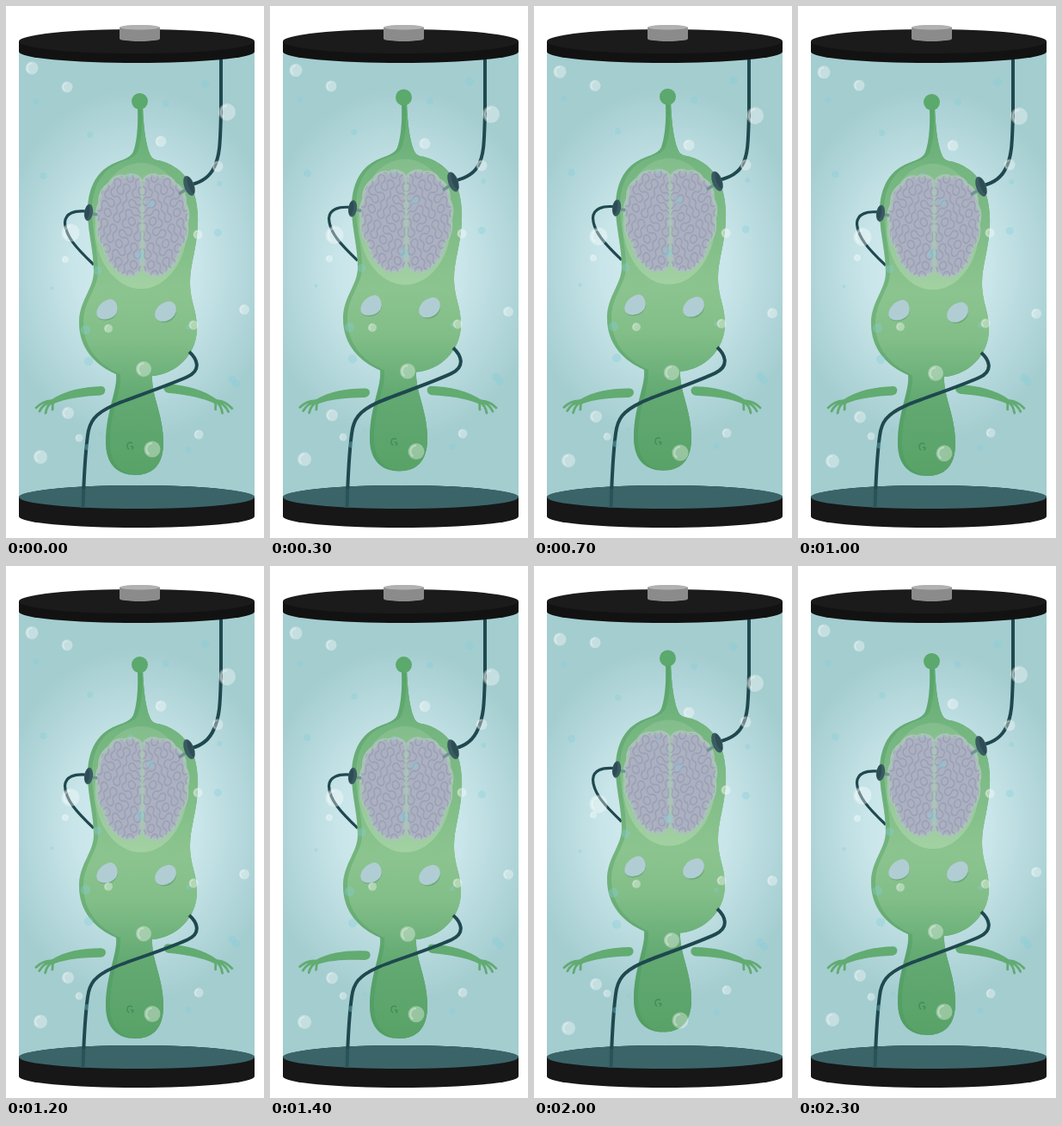
Animation, 300 px wide and 617 px high, one loop 2400 ms. Source, as an HTML page:

```html
<!DOCTYPE html>
<html lang="en">
<head>
<meta charset="utf-8">
<title>Specimen tank</title>
<style>
  html, body { margin: 0; width: 100%; height: 100%; overflow: hidden; background: #fff; }
  svg { display: block; width: 300px; height: 617px; }
  .wire { fill: none; stroke: #1f484f; stroke-width: 4; }
  .thin { stroke-width: 3.2; }
  .plug { fill: #3a5b63; }
  .slot { fill: #2d4c54; }
  .prong { stroke: #6f9490; stroke-width: 3.5; }
  .fingers { fill: none; stroke: #62ab71; stroke-width: 2.8; stroke-linecap: round; }
  .folds { fill: none; stroke: #9699b2; stroke-width: 1.7; opacity: .65; }
</style>
</head>
<body>
<svg viewBox="0 0 300 617">
  <defs>
    <radialGradient id="water" gradientUnits="userSpaceOnUse" cx="0" cy="0" r="1" gradientTransform="translate(152 300) scale(165 205)">
      <stop offset="0" stop-color="#d8eef1"/>
      <stop offset=".45" stop-color="#c8e5e9"/>
      <stop offset="1" stop-color="#a4cdd0"/>
    </radialGradient>
    <linearGradient id="skin" gradientUnits="userSpaceOnUse" x1="0" y1="100" x2="0" y2="544">
      <stop offset="0" stop-color="#5ba96c"/>
      <stop offset=".2" stop-color="#74b580"/>
      <stop offset=".52" stop-color="#8cc48f"/>
      <stop offset=".64" stop-color="#82be88"/>
      <stop offset=".8" stop-color="#62a972"/>
      <stop offset="1" stop-color="#58a267"/>
    </linearGradient>
    <linearGradient id="dome" x1="0" y1="0" x2="0" y2="1">
      <stop offset="0" stop-color="#83bd8b"/>
      <stop offset="1" stop-color="#a2d1a2"/>
    </linearGradient>
    <path id="torso" d="M153 117 C154 140 152 158 148 169 C144 178 132 178 119 186
      C101 197 95 218 95 238 C95 263 102 283 102 308 C102 328 85 342 85 367
      C85 398 105 417 128 427 C130 446 116 470 116 506 C116 532 130 544 150 544
      C171 544 183 532 183 506 C183 474 169 452 170 429 C198 427 222 404 222 374
      C222 352 214 343 214 320 C214 298 224 276 223 244 C222 214 211 189 181 180
      C174 178 170 179 167 171 C162 158 160 140 159 117 Z"/>
    <clipPath id="torsoClip"><use href="#torso"/></clipPath>
    <path id="lobe" d="M158 205 C155 195 143 194 139 198 C131 196 124 199 121 206
      C111 211 108 221 109 229 C104 238 105 246 107 252 C105 264 109 274 114 280
      C117 293 121 302 128 305 C134 314 151 317 157 305 Z"/>
    <clipPath id="lobeClip"><use href="#lobe"/></clipPath>
    <g id="arm">
      <path d="M111 441 C90 441.500 68 446 52 457 L55 461.500 C70 455 90 452.500 110 451.500 C117 450.500 117 441.500 111 441Z" fill="#62ab71"/>
      <path class="fingers" d="M55 458 C47 457 41 460 35 466 M54 459 C46 460 42 464 39 470 M54 459 C49 462 47 466 46 472 M55 460 C53 463 55 466 54 468"/>
    </g>
  </defs>

  <rect x="15" y="45" width="274" height="530" fill="url(#water)"/>
  <path d="M15 570 A137 14 0 0 1 289 570 L289 592 A137 13 0 0 1 15 592 Z" fill="#171717"/>
  <ellipse cx="152" cy="569.500" rx="137" ry="13.500" fill="#3b6469"/>

  <use id="armL" href="#arm"/>
  <g transform="translate(298) scale(-1 1)"><use id="armR" href="#arm"/></g>

  <path id="wireTop" class="wire"/>
  <g id="creature">
    <path class="wire thin" d="M93 238 C80 237 69 240 68.500 251 C69 267 82 281 102 300"/>
    <use href="#torso" fill="url(#skin)"/>
    <use href="#torso" fill="#3f9158" opacity=".3"/>
    <g clip-path="url(#torsoClip)"><use href="#torso" x="5" fill="url(#skin)"/></g>
    <circle cx="155.500" cy="110.500" r="9.500" fill="#5ba96c"/>
    <ellipse cx="157" cy="255" rx="54" ry="73" fill="url(#dome)"/>
    <g id="half">
      <use href="#lobe" fill="#abb1c0" stroke="#aac4b8" stroke-width="3.500"/>
      <g clip-path="url(#lobeClip)"><path id="folds" class="folds"/></g>
    </g>
    <use href="#half" transform="translate(317) scale(-1 1)"/>
    <g fill="#6baa79">
      <path d="M106 360 C109 367 126 367 130 354 L126 345Z"/>
      <path d="M174 361 C177 370 194 370 198 356 L190 348Z"/>
    </g>
    <g fill="#b1cdd4">
      <path d="M121 340 C127 339 131 348 129 355 C126 363 112 366 107 361 C102 355 109 342 121 340Z"/>
      <path d="M187 343 C194 341 200 347 197 356 C194 365 180 369 175 363 C170 356 177 345 187 343Z"/>
    </g>
    <path d="M147 507 C141 504 139 511 143 514 M145 511 C148 510 149 513 146 514" fill="none" stroke="#438a56" stroke-width="1.300"/>
    <path class="prong" d="M96 240 L106 242 M212 211 L201 218"/>
    <g transform="translate(96 239.500) rotate(8)">
      <ellipse class="plug" rx="5" ry="9.800"/><ellipse class="slot" cx="-1.500" rx="2.500" ry="8"/>
    </g>
    <g transform="translate(213 208.500) rotate(-20)">
      <ellipse class="plug" rx="5.800" ry="12"/><ellipse class="slot" cx="2" rx="2.800" ry="10"/>
    </g>
  </g>
  <path id="wireLow" class="wire" d="M213 -180 C222 -172 228 -159 211 -151 C182 -138 143 -126 125 -118 C103 -108 97 -99 95 -83 C92 -61 90.500 -31 89.500 0"/>
  <path d="M87 560 H95 V582 H86Z" fill="#3b6469" opacity=".4"/>

  <g id="bubbles"></g>

  <path d="M15 41 V53 A137 13 0 0 0 289 53 V41 Z" fill="#121212"/>
  <ellipse cx="152" cy="41" rx="137" ry="14" fill="#1b1b1b"/>
  <path d="M132 25 V38 A23.500 3 0 0 0 179 38 V25 Z" fill="#8b8b8b"/>
  <ellipse cx="155.500" cy="24.700" rx="23.500" ry="2.800" fill="#b1b1b1"/>
</svg>
<script>
const LOOP = 2400, STEP = 100, FLOOR = 581, WIRE = 180;
const $ = id => document.getElementById(id);

let seed = 11;
const rnd = () => (seed = seed * 16807 % 2147483647) / 2147483647;

// Eases through [time, offset] turning points; rests at 0 where the loop closes.
function swing(...turns) {
  const keys = [[0, 0], ...turns, [LOOP, 0]];
  return t => {
    const i = keys.findIndex(k => k[0] > t);
    const [t0, a] = keys[i - 1], [t1, b] = keys[i];
    return a + (b - a) * (1 - Math.cos(Math.PI * (t - t0) / (t1 - t0))) / 2;
  };
}

const bob = swing([500, -7], [1300, 4.5], [2000, -3.5], [2300, 0]);
const leftArm = swing([500, 4], [1000, 0], [1450, 6], [2000, 1]);
const rightArm = swing([500, 4], [1250, 0], [2000, 4]);
const sink = swing([500, 4], [1600, 6], [2000, 13], [2300, 3]);
const drift = {
  tint: t => -4 * Math.sin(2 * Math.PI * t / LOOP),
  rise: t => -.4 * sink(t),
  sink
};

function add(parent, tag, attrs) {
  const el = document.createElementNS('http://www.w3.org/2000/svg', tag);
  for (const k in attrs) el.setAttribute(k, attrs[k]);
  return parent.appendChild(el);
}

const layers = {};
for (const kind in drift) layers[kind] = add($('bubbles'), 'g', {});

// Faint specks: one per cell of a loose grid.
for (let i = 0; i < 20; i++) {
  add(layers.tint, 'circle', {
    cx: 35 + (i % 4 + rnd()) * 60, cy: 70 + (Math.floor(i / 4) + rnd()) * 92,
    r: 2 + rnd() * 4, fill: '#83cfda', opacity: .35
  });
}

function bubble(kind, x, y, r) {
  const w = r * .72;
  add(layers[kind], 'circle', { cx: x, cy: y, r, fill: '#fff', opacity: .36 });
  add(layers[kind], 'path', {
    d: `M${x} ${y - w} A${w} ${w} 0 0 0 ${x - w * .5} ${y + w * .85}`,
    fill: 'none', stroke: '#fff', 'stroke-width': r * .2, opacity: .36
  });
}
bubble('sink', 30, 72, 7.5);
bubble('sink', 257, 123, 10);
bubble('sink', 75, 263, 10.5);
bubble('sink', 180, 157, 6.5);
bubble('sink', 277, 352, 6);
bubble('sink', 160, 421, 9);
bubble('sink', 170, 514, 9.5);
bubble('sink', 72, 472, 7);
bubble('sink', 40, 523, 8);
bubble('rise', 71, 94, 6.5);
bubble('rise', 246, 186, 6.5);
bubble('rise', 223, 265, 5.5);
bubble('rise', 218, 370, 5.5);
bubble('rise', 119, 374, 5);
bubble('rise', 69, 294, 4);
bubble('rise', 85, 501, 4.5);
bubble('rise', 224, 497, 5.5);

// Winding folds: quarter-arc tiles, mostly turned one way so that they run on.
const S = 8, H = S / 2;
let folds = '';
for (let y = -72; y < 72; y += S) {
  for (let x = -72; x < 72; x += S) {
    const arc = ` a${H} ${H} 0 0 `;
    folds += rnd() < .72
      ? `M${x + H} ${y}${arc}1 ${-H} ${H} M${x + S} ${y + H}${arc}0 ${-H} ${H}`
      : `M${x + H} ${y}${arc}0 ${H} ${H} M${x} ${y + H}${arc}1 ${H} ${H}`;
  }
}
$('folds').setAttribute('d', folds);
$('folds').setAttribute('transform', 'translate(132 255) rotate(-20) scale(.95 1.2)');

function place(el, transform) {
  el.setAttribute('transform', transform);
}

// Tilts an arm about its wrist so that the shoulder end drops by dy.
function tilt(el, dy) {
  place(el, `rotate(${Math.atan(dy / 64) * 180 / Math.PI} 50 462)`);
}

function draw(now) {
  const t = Math.floor(now % LOOP / STEP) * STEP;
  const dy = bob(t);
  place($('creature'), `translate(0 ${dy})`);
  tilt($('armL'), leftArm(t));
  tilt($('armR'), rightArm(t) - 3);
  for (const kind in layers) place(layers[kind], `translate(0 ${drift[kind](t)})`);
  place($('wireLow'), `translate(0 ${FLOOR}) scale(1 ${(WIRE - dy) / WIRE})`);
  $('wireTop').setAttribute('d',
    `M250 58 V125 C249 158 249 173 242 ${187 + dy * .4} C237 ${198 + dy * .7} 228 ${204 + dy} 216 ${207 + dy}`);
}

function loop() {
  draw(performance.now());
  requestAnimationFrame(loop);
}
loop();
</script>
</body>
</html>
```
